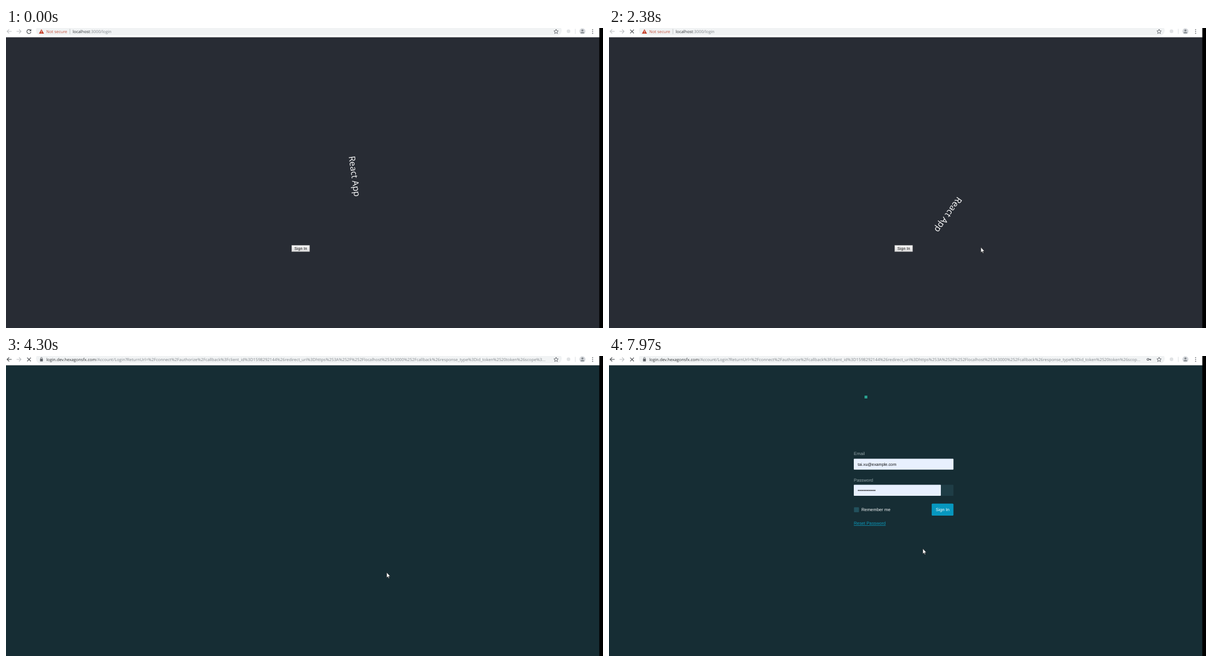
Animation of 1056x530 px, one loop 8000 ms. Source, as an HTML page:

```html
<!DOCTYPE html>
<html lang="en">
<head>
<meta charset="utf-8">
<title>Login flow</title>
<style>
  html, body { margin: 0; width: 100%; height: 100%; overflow: hidden; background: #000; }
  svg { display: block; width: 1056px; height: 530px; text-rendering: geometricPrecision; }
  .bar { font: 7.32px "Open Sans", "Noto Sans", sans-serif; fill: #80868b; }
  .bar .host { fill: #2e3134; }
  .spin { font: 15.4px "Open Sans", "Noto Sans", sans-serif; fill: #fff; text-anchor: middle; }
  .form { font: 7.75px "Liberation Sans", Arial, sans-serif; }
  .small { font-size: 7.3px; }
  .line { fill: none; stroke: #5f6368; stroke-width: 1.1; }
  .dark { stroke: #45484c; }
</style>
</head>
<body>
<svg viewBox="0 0 1056 530" xmlns="http://www.w3.org/2000/svg">
  <rect width="1056" height="530" fill="#000"/>
  <rect id="page" y="16" width="1049.5" height="514"/>

  <g id="home">
    <text id="spin" class="spin" x="521" y="184">React App</text>
    <linearGradient id="btn" x2="0" y2="1">
      <stop stop-color="#f8f8f8"/><stop offset="1" stop-color="#dcdcdc"/>
    </linearGradient>
    <rect x="505.4" y="384" width="31.6" height="11" fill="url(#btn)" stroke="#b4b4b4" stroke-width=".6"/>
    <text class="form" style="font-size:7.2px" x="510" y="392.1" fill="#111">Sign In</text>
  </g>

  <g id="form" class="form">
    <text x="433" y="175.4" fill="#94a5a9">Email</text>
    <text x="433" y="221.6" fill="#94a5a9">Password</text>
    <rect x="433" y="181.4" width="176.3" height="19.4" rx="1" fill="#1f3d46"/>
    <rect x="433" y="227.6" width="176.3" height="19.4" rx="1" fill="#1f3d46"/>
    <g id="fill">
      <rect x="433" y="181.4" width="176.3" height="19.4" rx="1" fill="#e8f0fe"/>
      <text class="small" x="440" y="194" fill="#111">tai.xu@example.com</text>
      <rect x="433" y="227.6" width="154" height="19.4" rx="1" fill="#e8f0fe"/>
      <path d="M441.2 237.6H470.4" stroke="#111" stroke-width="2" stroke-linecap="round" stroke-dasharray="0 2.64"/>
    </g>
    <rect x="433.3" y="267.2" width="8.8" height="8.8" rx=".8" fill="#22505c"/>
    <text x="446.5" y="274.4" fill="#f2f5f6">Remember me</text>
    <rect x="570.8" y="260.8" width="38.5" height="21.2" rx="1.5" fill="#0797bf"/>
    <text x="578" y="274.2" fill="#fff">Sign In</text>
    <text x="433" y="298.2" fill="#0b98ba" text-decoration="underline">Reset Password</text>
  </g>
  <rect id="mark" x="452" y="70" width="5" height="5" fill="#2a9f8f"/>

  <g class="bar">
    <rect width="1049.5" height="16" fill="#fff"/>
    <rect y="16" width="1049.5" height=".6" fill="#b6b6b6"/>
    <rect x="53" y="-4" width="930" height="17.2" rx="8.6" fill="#f1f3f4"/>
    <path id="back" class="line" d="M10 6H2M5.6 2.3L1.9 6L5.6 9.7"/>
    <path class="line" style="stroke:#bdc0c3" d="M18.6 6H26.6M23 2.3L26.7 6L23 9.7"/>
    <g id="reload">
      <path class="line dark" d="M43.2 3.8A3.6 3.6 0 1 0 44.1 6.8"/>
      <path d="M44.6 1.8V5.4H41Z" fill="#45484c"/>
    </g>
    <path id="stop" class="line dark" d="M37.5 2.8L44 9.3M44 2.8L37.5 9.3"/>

    <g id="local">
      <path d="M62.7 1.9L67.2 9.9H58.2Z" fill="#c5402a"/>
      <path d="M62.7 4.6V7M62.7 7.8V8.8" stroke="#fff" stroke-width=".9"/>
      <text x="71.2" y="8.7" style="fill:#c5523c">Not secure</text>
      <rect x="112.6" y="1.6" width=".8" height="9" fill="#b4b7ba"/>
      <text x="118" y="8.7"><tspan class="host">localhost</tspan>:3000/login</text>
    </g>
    <g id="remote">
      <rect x="60.2" y="5" width="5" height="4.4" rx=".5" fill="#5f6368"/>
      <path class="line" style="stroke-width:.9" d="M61.3 5V3.9A1.4 1.4 0 0 1 64.1 3.9V5"/>
      <text x="71.2" y="8.7"><tspan class="host">login.dev.hexagonsfx.com</tspan><tspan id="path"></tspan></text>
    </g>

    <g id="key">
      <circle class="line" cx="953.3" cy="6" r="1.7"/>
      <path class="line" style="stroke-width:1.4" d="M955 6H959M957.8 6V8"/>
    </g>
    <path class="line" style="stroke-width:.9" d="M973 2.2L974.1 4.9L977 5.1L974.8 7L975.5 9.8L973 8.3L970.5 9.8L971.2 7L969 5.1L971.9 4.9Z"/>
    <circle cx="995" cy="5.8" r="3.2" fill="#e0e2e4"/>
    <rect x="1006.6" y="1.5" width=".8" height="9" fill="#d3d6d9"/>
    <circle cx="1019.6" cy="5.8" r="5.3" fill="#d5d8dc"/>
    <circle cx="1019.6" cy="4.2" r="1.8" fill="#80868b"/>
    <path d="M1016.2 9.2Q1016.4 6.9 1019.6 6.9T1023 9.2Z" fill="#80868b"/>
    <g fill="#5f6368">
      <circle cx="1037.6" cy="2.8" r=".9"/><circle cx="1037.6" cy="6.1" r=".9"/><circle cx="1037.6" cy="9.4" r=".9"/>
    </g>
  </g>

  <path id="cursor" d="M.3 .3V9.7L2.4 7.8L3.8 11L5.2 10.4L3.8 7.3H6.7Z" fill="#fff" stroke="#111" stroke-width=".6"/>
</svg>
<script>
const LOOP = 8000;
const CLICK = 1990, LEAVE = 3595, DARK = 4300, FORM = 7255, FILLED = 7345, MARK = 7870;
const $ = id => document.getElementById(id);
const show = (id, on) => { $(id).style.display = on ? "" : "none"; };

const query = "/Account/Login?ReturnUrl=%2Fconnect%2Fauthorize%2Fcallback%3Fclient_id%3D1598292144" +
  "%26redirect_uri%3Dhttps%253A%252F%252Flocalhost%253A3000%252Fcallback" +
  "%26response_type%3Did_token%2520token%26scop";

// Pointer stops: time, x, y
const stops = [
  [530, 674, 452], [640, 640, 425], [836, 591, 384], [900, 585, 378],
  [1100, 430, 280], [1370, 247, 174], [1600, 330, 250], [1760, 430, 335],
  [1930, 518, 388], [2140, 521, 388], [2368, 657.5, 387], [2510, 673, 382],
  [5050, 673, 382], [5240, 520, 260], [5480, 259, 110], [5620, 290, 87],
  [5854, 440, 166], [6008, 444.4, 177], [6350, 438, 228], [6700, 430, 264.5],
  [6937, 425, 258], [7640, 425, 258], [7712, 448, 282], [7789, 497, 318],
  [7867, 537, 335], [7943, 554.8, 340]
];

function pointer(t) {
  const i = stops.findIndex(s => s[0] > t);
  if (i < 0) return stops[stops.length - 1].slice(1);
  const [t0, x0, y0] = stops[Math.max(0, i - 1)], [t1, x1, y1] = stops[i];
  const k = t1 > t0 ? (t - t0) / (t1 - t0) : 0;
  return [x0 + (x1 - x0) * k, y0 + (y1 - y0) * k];
}

// The screen refreshes in steps of about 77 ms
function step(t) {
  const [from, size] = t < 5080 ? [70, 76.6] : [5080, 77.4];
  return Math.max(0, from + Math.floor((t - from) / size) * size);
}

function draw(time) {
  const t = time % LOOP, s = step(t);
  const away = t >= LEAVE;
  $("page").setAttribute("fill", !away ? "#282c34" : t < DARK ? "#fff" : "#162d34");
  $("spin").setAttribute("transform", `rotate(${82.2 + s * 0.018} 521 275)`);
  $("back").style.stroke = away ? "#45484c" : "#bdc0c3";
  $("path").textContent = query + (t < FILLED ? "e%3..." : "...");
  show("home", !away);
  show("local", !away);
  show("remote", away);
  show("reload", t < CLICK);
  show("stop", t >= CLICK);
  show("form", t >= FORM);
  show("fill", t >= FILLED);
  show("key", t >= FILLED);
  show("mark", t >= MARK);
  show("cursor", s >= stops[0][0]);
  $("cursor").setAttribute("transform", `translate(${pointer(s)})`);
}

const start = performance.now();
function tick() {
  draw(performance.now() - start);
  requestAnimationFrame(tick);
}
tick();
</script>
</body>
</html>
```
